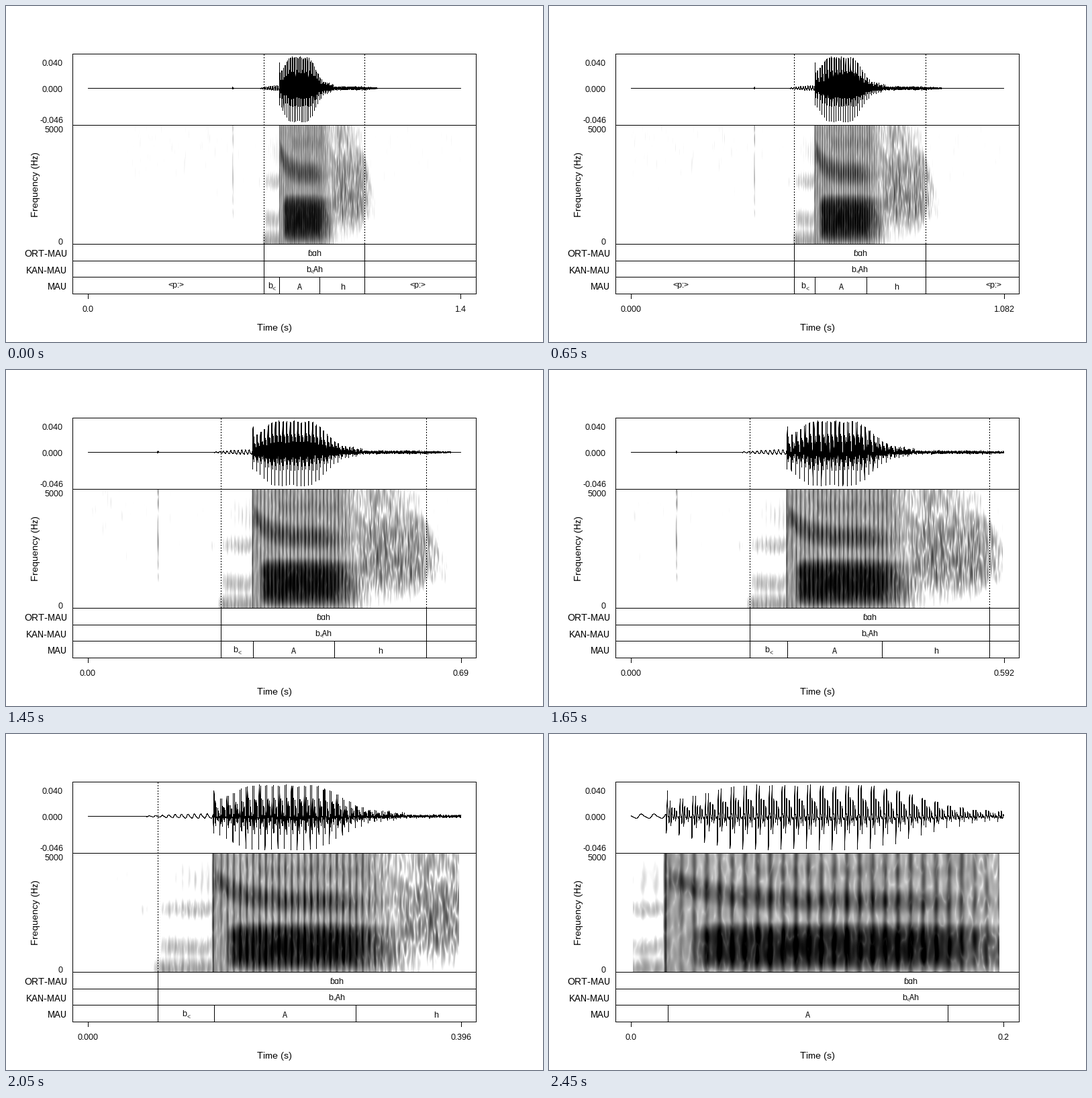
A matplotlib script that plays this animation: 800 px wide and 500 px high, repeating every 2.5 s.

```python
import numpy as np
import matplotlib.pyplot as plt
from matplotlib.animation import FuncAnimation
from matplotlib.patches import Rectangle

W, H, DPI = 800, 500, 100
PX = 72 / DPI                          # points per pixel
FRAMES, INTERVAL = 50, 50
LEFT, RIGHT, COLS = 122, 677.95, 556   # pixels spanned by the time window
BOX_L, BOX_R = 99.5, 700.5
ROWS = [71.5, 177.5, 354.5, 379.5, 403.5, 428.5]
DURATION, FILE_END = 1.4, 1.436
ZERO_Y = 122.5
PULSE_T, PERIOD = 0.7188, 0.00683      # first glottal pulse and their spacing
BLIP_T = 0.5438
WORD_START, VOWEL, BREATH, WORD_END = 0.66, 0.7198, 0.87, 1.04
SPEC_RATE = 2780                       # spectrogram columns per second
OFF = -0.5                             # level of a silent band

plt.rcParams.update({
    "font.family": ["Liberation Sans", "DejaVu Sans"],
    "text.hinting": "native",
    "text.hinting_factor": 1,
    "path.snap": False,
    "path.simplify": False,
    "agg.path.chunksize": 5000,
})


def ramp(v, a, b):
    """Smooth step from 0 at a to 1 at b."""
    s = np.clip((v - a) / (b - a), 0, 1)
    return s * s * (3 - 2 * s)


def gate(v, a, b, c, d):
    """Rise over a..b, fall over c..d."""
    return ramp(v, a, b) * (1 - ramp(v, c, d))


def bell(v, centre, width):
    return np.exp(-((v - centre) / width) ** 2)


def make_wave():
    rng = np.random.default_rng(4)
    t = np.arange(0, DURATION + 1e-9, 1 / 16000)
    start = PULSE_T + np.floor((t - PULSE_T) / PERIOD) * PERIOD
    tau = t - start

    def ring(freq, decay):
        return np.sin(2 * np.pi * freq * tau) * np.exp(-tau / decay)

    # each glottal pulse excites three decaying formants
    pulse = -ring(820, 0.0045) - 0.8 * ring(1220, 0.0035) + 0.2 * ring(2900, 0.003)
    loud = (0.4 + 0.6 * ramp(start, 0.715, 0.76)) * (1 - ramp(start, 0.82, 0.89))
    size = (38 * loud + 8 * (1 - ramp(start, 0.89, 0.94))) * (start > PULSE_T - 1e-6)
    voice = np.where(pulse > 0, pulse / pulse.max(), -1.08 * pulse / pulse.min()) * size
    voice += 15 * bell(t, 0.7196, 0.0003)

    phase = 2 * np.pi * (t - 0.7195) / PERIOD
    hum = 3 * ramp(t, 0.63, 0.70) * (t < PULSE_T)
    hum = hum * (np.cos(phase) + 0.25 * np.cos(2 * phase + 1))
    hiss = np.convolve(rng.standard_normal(t.size), [0.5, 0.7, 0.5], "same")
    hiss *= 0.9 * gate(t, 0.72, 0.75, 1.02, 1.12)
    blip = 1.6 * bell(t, BLIP_T, 0.001) * np.cos(2 * np.pi * 1200 * (t - BLIP_T))
    return t, ZERO_Y - np.clip(voice + hum + hiss + blip, -51, 47.5)


def noise_power(shape, sigma_y, sigma_t):
    """Smoothed complex noise, returned as power with mean one."""
    rng = np.random.default_rng(11)
    z = rng.standard_normal(shape) + 1j * rng.standard_normal(shape)
    fy = np.fft.fftfreq(shape[0])[:, None]
    ft = np.fft.fftfreq(shape[1])[None, :]
    blur = np.exp(-2 * np.pi ** 2 * ((sigma_y * fy) ** 2 + (sigma_t * ft) ** 2))
    p = np.abs(np.fft.ifft2(np.fft.fft2(z) * blur)) ** 2
    return p / p.mean()


def make_spectrogram():
    """Darkness (0 white, 1 black) over the full recording."""
    t = np.arange(int(DURATION * SPEC_RATE)) / SPEC_RATE
    y = (178.5 + np.arange(176))[:, None]

    def band(amp, times, centre=0, width=np.inf, power=2):
        shape = np.exp(-(np.abs(y - centre) / width) ** power)
        return OFF + (amp - OFF) * gate(t, *times) * shape

    def click(amp, time, width):
        return OFF + (amp - OFF) * bell(t, time, width)

    release = (0.7185, 0.7195)
    room = -0.6 + 0.39 * ramp(t, 0.12, 0.14) - 0.05 * ramp(t, 0.45, 0.6)
    f3 = 250 - 36 * np.exp(-np.maximum(t - VOWEL, 0) / 0.025)
    parts = [
        room - 0.4 * ramp(y, 230, 350),
        # voicing before the release
        band(0.33, (0.64, 0.665, *release), 350, 30),
        band(0.24, (0.65, 0.67, *release), 318, 26),
        band(0.24, (0.60, 0.70, *release), 261, 22),
        band(0.04, (0.60, 0.71, *release), 215, 45),
        # vowel: whole range, low formants, third formant, upper band
        band(0.40, (0.7175, 0.7195, 0.87, 1.0)),
        band(0.93, (0.71, 0.745, 0.85, 1.0), 316, 45, 4),
        band(0.68, (0.7175, 0.721, 0.84, 1.0), f3, 38),
        band(0.46, (0.74, 0.77, 0.87, 0.97), 203, 34),
        # breathy ending
        band(0.40, (0.86, 0.93, 1.02, 1.12), 270 + 35 * ramp(t, 1.03, 1.1),
             78 - 56 * ramp(t, 1.0, 1.1), 4),
        band(0.45, (0.90, 0.97, 1.02, 1.07), 285, 48),
        band(0.28, (0.88, 0.94, 0.94, 1.12), 195, 70),
        click(0.82, 0.7184, 0.0015),
        click(0.32 + 0.07 * np.cos((y - 185) / 14) - 0.5 * ramp(y, 305, 325),
              BLIP_T, 0.0018),
    ]
    soft = 0.05
    level = parts[0] / soft
    for part in parts[1:]:
        level = np.logaddexp(level, part / soft)
    level = level * soft

    grain = 0.14 - 0.095 * gate(t, 0.64, 0.66, 0.86, 0.94)
    level += grain * (np.log(noise_power(level.shape, 9, 2.5) + 0.05) + 0.3)

    phase = 2 * np.pi * (t - PULSE_T - 0.0012) / PERIOD
    depth = gate(t, 0.65, 0.67, 0.86, 0.94) * (0.4 + 0.6 * ramp(t, 0.718, 0.735))
    beat = depth * (np.cos(phase) + 0.35 * np.cos(2 * phase))
    level += beat * (0.16 - 0.05 * ramp(y, 265, 300))
    return np.clip(level, 0, 1)


wave_t, wave_y = make_wave()
spec = make_spectrogram()

fig = plt.figure(figsize=(W / DPI, H / DPI), dpi=DPI, facecolor="white")
ax = fig.add_axes([0, 0, 1, 1])
ax.set_xlim(0, W)
ax.set_ylim(H, 0)
ax.axis("off")
ax.set_autoscale_on(False)

image = ax.imshow(np.zeros((176, COLS)), cmap="gray_r", vmin=0, vmax=1,
                  extent=(LEFT, LEFT + COLS, 354, 178), interpolation="nearest",
                  aspect="auto", zorder=0)


def line(x, y, **style):
    return ax.plot(x, y, color="black", lw=PX, **style)[0]


def text(x, baseline, s, size, ha="center", **style):
    return ax.text(x, baseline, s, size=size * PX, ha=ha, va="baseline",
                   color="black", **style)


def pixel(v):
    """Centre of the pixel that holds v."""
    return np.floor(v) + 0.5


for y in ROWS:
    line([BOX_L, BOX_R], [y, y])
for x in (BOX_L, BOX_R):
    line([x, x], [ROWS[0], ROWS[-1]])
line([LEFT + 0.5] * 2, [428.5, 435.5])
end_tick = line([0, 0], [428.5, 435.5])

for y, s in [(89, "0.040"), (128, "0.000"), (174, "-0.046"), (188, "5000"), (355, "0")]:
    text(85, y, s, 12, "right")
for y, s in [(373, "ORT-MAU"), (398, "KAN-MAU"), (422, "MAU")]:
    text(91, y, s, 14, "right")
text(399.5, 483, "Time (s)", 14)
text(48, 266, "Frequency (Hz)", 14, rotation=90, rotation_mode="anchor")
start_label = text(LEFT, 455, "", 12)
end_label = text(RIGHT, 455, "", 12)

wave = line([], [], zorder=3)

bounds = []                            # (time, line)
for time in (WORD_START, WORD_END):
    bounds.append((time, line([0, 0], [72, 354], ls=(0, (2, 2)))))
    bounds.append((time, line([0, 0], [354.5, 428.5])))
for time in (VOWEL, BREATH):
    bounds.append((time, line([0, 0], [403.5, 428.5])))

plot_box = Rectangle((100, 72), 600, 356, transform=ax.transData)
labels = []                            # (time, pixel offset, text)


def tier_label(t0, t1, baseline, s, dx=0, size=12):
    item = text(0, baseline, s, size, clip_on=True)
    item.set_clip_path(plot_box)
    labels.append(((t0 + t1) / 2, dx, item))


tier_label(WORD_START, WORD_END, 372, "ɓɑh")
tier_label(WORD_START, WORD_END, 396, "b Ah")
tier_label(WORD_START, WORD_END, 398, "<", -3.5, 8)
tier_label(0, WORD_START, 419, "<p:>")
tier_label(WORD_START, VOWEL, 420, "b", -2.5)
tier_label(WORD_START, VOWEL, 423, "<", 3.5, 8)
tier_label(VOWEL, BREATH, 422, "A")
tier_label(BREATH, WORD_END, 422, "h")
tier_label(WORD_END, FILE_END, 419, "<p:>")


def update(k):
    u = k / (FRAMES - 1)
    t0, t1 = 0.7 * u, DURATION - 0.5 * u
    span = t1 - t0

    def to_x(t):
        return LEFT + (t - t0) / span * (RIGHT - LEFT)

    shown = (wave_t >= t0) & (wave_t <= t1)
    wave.set_data(pixel(to_x(wave_t[shown])), pixel(wave_y[shown]))

    def sample(shift):
        t = t0 + (np.arange(COLS) + shift) / COLS * span
        return t, spec[:, np.minimum((t * SPEC_RATE).astype(int), spec.shape[1] - 1)]

    t, first = sample(0.25)
    _, second = sample(0.75)
    inside = (t > t0 + 0.001) & (t < t1 - 0.0025)
    image.set_data(np.where(inside, (first + second) / 2, 0))

    for time, item in bounds:
        x = pixel(to_x(time))
        item.set_xdata([x, x])
        item.set_visible(BOX_L < x < BOX_R)
    for time, dx, item in labels:
        item.set_x(to_x(time) + dx)

    # the last tick sits at the rounded duration
    end = f"{span:.3f}".rstrip("0")
    x = pixel(to_x(t0 + float(end)))
    end_tick.set_xdata([x, x])
    end_label.set_text(end)
    end_label.set_x(x - 0.5)
    start_label.set_text(f"{0:.{len(end.split('.')[1])}f}")
    return []


anim = FuncAnimation(fig, update, frames=FRAMES, interval=INTERVAL,
                     repeat=True, repeat_delay=0, blit=False)
plt.show()
```
